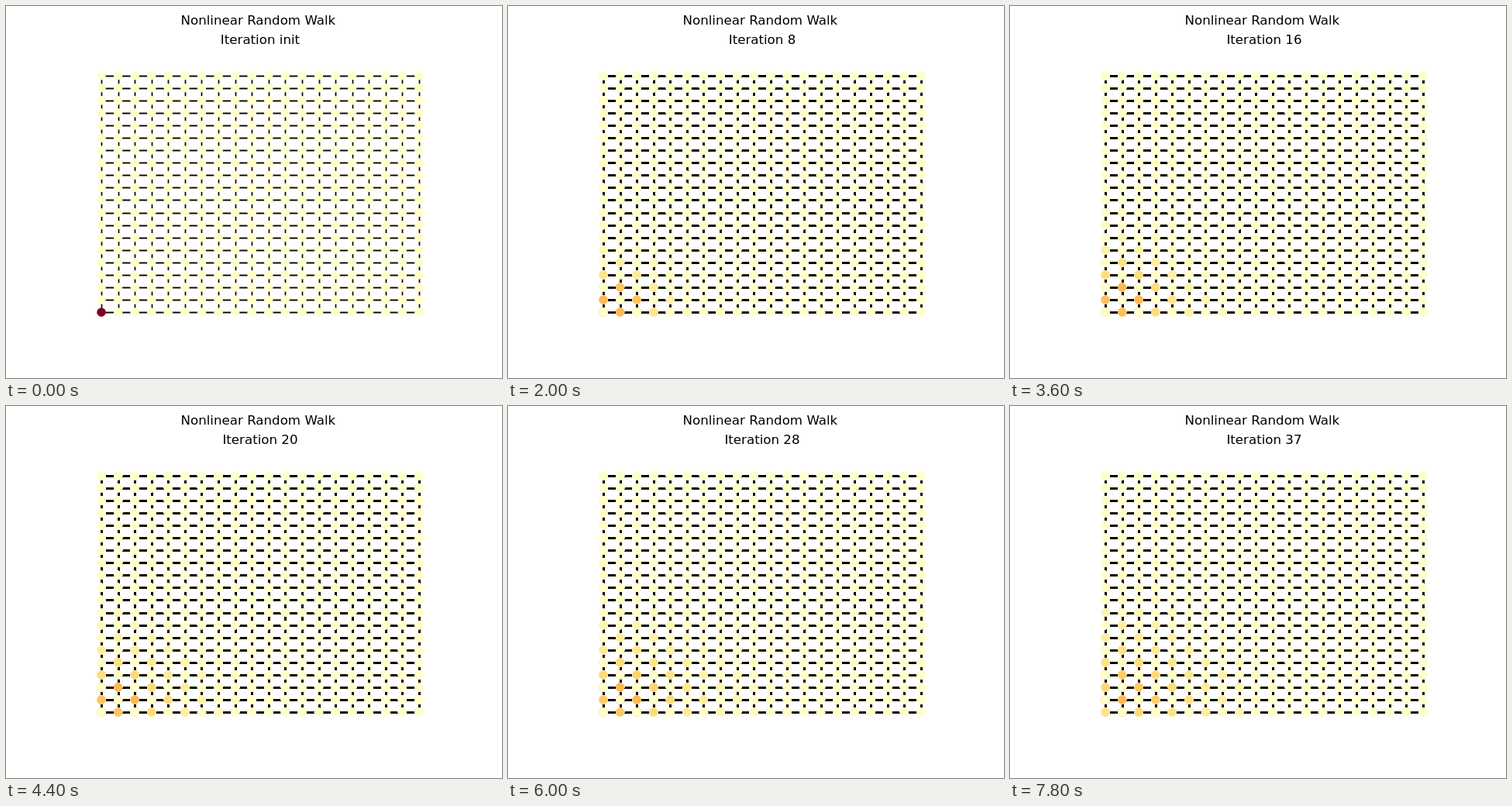
An HTML page with a canvas for the animation above (8000 ms loop, 640 px wide and 480 px high).

```html
<!DOCTYPE html>
<html lang="en">
<head>
<meta charset="utf-8">
<title>Nonlinear Random Walk</title>
<style>
  html, body { margin: 0; width: 100%; height: 100%; overflow: hidden; background: #fff; }
  canvas, svg { position: absolute; left: 0; top: 0; width: 640px; height: 480px; }
  text { font: 16.667px "DejaVu Sans", sans-serif; text-anchor: middle; fill: #000; }
</style>
</head>
<body>
<canvas id="edges" width="640" height="480"></canvas>
<canvas id="nodes" width="640" height="480"></canvas>
<svg viewBox="0 0 640 480">
  <text x="325.4" y="24">Nonlinear Random Walk</text>
  <text id="label" x="328" y="49">Iteration init</text>
</svg>
<script>
const SIZE = 20, STEP_MS = 200, STEPS = 40;
const RADIUS = 5.604, LINE_WIDTH = 1.389;
const PEAK = 0.355; // colour level of the most likely node once the walk has begun
const RAMP = ['ffffcc', 'ffeda0', 'fed976', 'feb24c', 'fd8d3c', 'fc4e2a', 'e31a1c', 'bd0026', '800026']
  .map(hex => [0, 2, 4].map(i => parseInt(hex.slice(i, i + 2), 16)));

const edges = document.getElementById('edges').getContext('2d');
const nodes = document.getElementById('nodes').getContext('2d');
const label = document.getElementById('label');

const nodeX = col => 123.04 + col * 409.92 / (SIZE - 1);
const nodeY = row => 395.13 - row * 305.46 / (SIZE - 1);
const snap = v => Math.floor(v + 0.5) + 0.5;

function neighbours(index) {
  const col = index % SIZE, row = Math.floor(index / SIZE), list = [];
  if (col > 0) list.push(index - 1);
  if (col < SIZE - 1) list.push(index + 1);
  if (row > 0) list.push(index - SIZE);
  if (row < SIZE - 1) list.push(index + SIZE);
  return list;
}

function walk(state) {
  const next = new Array(state.length).fill(0);
  state.forEach((p, i) => {
    if (!p) return;
    const around = neighbours(i);
    for (const j of around) next[j] += p / around.length;
  });
  return next;
}

function colour(level) {
  const pos = Math.min(level, 1) * (RAMP.length - 1);
  const i = Math.min(Math.floor(pos), RAMP.length - 2);
  const mix = RAMP[i].map((c, k) => Math.round(c + (RAMP[i + 1][k] - c) * (pos - i)));
  return `rgb(${mix})`;
}

// The first two steps both show the starting state.
const start = new Array(SIZE * SIZE).fill(0);
start[0] = 1;
const palettes = [start.map(colour)];
palettes.push(palettes[0]);
for (let state = start; palettes.length < STEPS;) {
  state = walk(state);
  const scale = PEAK / Math.max(...state);
  palettes.push(state.map(p => colour(p * scale)));
}

const grid = new Path2D();
for (let a = 0; a < SIZE; a++) {
  const x = snap(nodeX(a)), y = snap(nodeY(a));
  for (let b = 0; b < SIZE - 1; b++) {
    grid.moveTo(nodeX(b), y);
    grid.lineTo(nodeX(b + 1), y);
    grid.moveTo(x, nodeY(b));
    grid.lineTo(x, nodeY(b + 1));
  }
}

const discs = start.map((_, i) => {
  const disc = new Path2D();
  disc.arc(nodeX(i % SIZE), nodeY(Math.floor(i / SIZE)), RADIUS, 0, 2 * Math.PI);
  return disc;
});

function paint(palette) {
  edges.lineWidth = LINE_WIDTH;
  edges.stroke(grid);
  discs.forEach((disc, i) => {
    nodes.fillStyle = palette[i];
    nodes.fill(disc);
  });
}

let shown = -1;

// Every step is painted over the earlier ones, so soft edges build up.
function show(step) {
  if (step < shown) shown = -1;
  if (shown < 0) {
    edges.clearRect(0, 0, 640, 480);
    nodes.clearRect(0, 0, 640, 480);
    paint(palettes[0]);
  }
  while (shown < step) paint(palettes[++shown]);
  label.textContent = 'Iteration ' + (step < 2 ? 'init' : step - 2);
}

const begin = performance.now();
function tick() {
  const step = Math.floor((performance.now() - begin) / STEP_MS) % STEPS;
  if (step !== shown) show(step);
  requestAnimationFrame(tick);
}
show(0);
requestAnimationFrame(tick);
</script>
</body>
</html>
```
